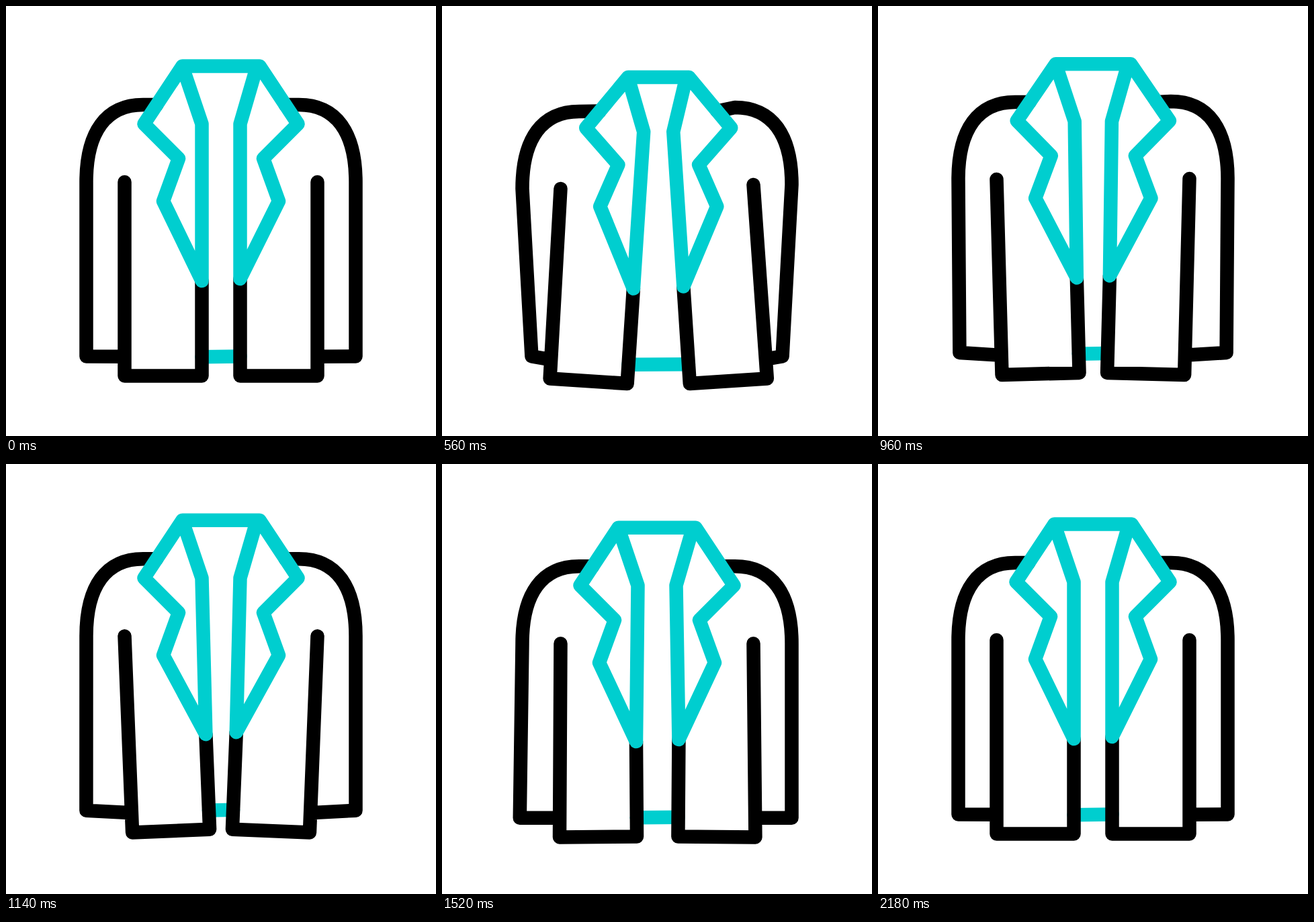
An HTML page that plays this animation: 640 px wide and 640 px high, repeating every 3.6 s.

```html
<!DOCTYPE html>
<html lang="en">
<head>
<meta charset="utf-8">
<title>Jacket</title>
<style>
  html, body { margin: 0; height: 100%; overflow: hidden; background: #fff; }
  svg { display: block; width: 100%; height: 100%; }
  path { fill: none; stroke-width: 20.5; stroke-linecap: round; stroke-linejoin: round; }
  #hem, #collar { stroke: #00cecf; }
  #body { stroke: #000; }
</style>
</head>
<body>
<svg viewBox="0 0 640 640">
  <path id="hem"/>
  <path id="body"/>
  <path id="collar"/>
</svg>
<script>
const LOOP = 3600, STEP = 20;

// Left half at rest; the right half is its mirror image
const arm = { cuff: [119.5, 521.5], pit: [119.5, 262], shoulder: [204, 147], seam: [176.5, 262] };
const lapel = {
  top: [262.5, 89.5], point: [205.5, 175.5], notch: [257, 227],
  low: [234, 290.5], tip: [291.5, 409], fold: [291.5, 175.5] };
const hem = { outer: [176.5, 550.5], inner: [291.5, 550.5] };

// pivot: height the front turns about, sink: drop of the shoulder,
// out and cuff: outward drift, raise: shorter lapel, inset: narrower fold
const left = { pivot: 308, sink: 10, out: 4.3, cuff: 4.5, raise: 0, inset: 0 };
const right = { pivot: 240, sink: 4, out: 6, cuff: 0, raise: 3, inset: 4, mirror: true };

const ease = (t, a, b) =>
  (1 - Math.cos(Math.PI * Math.min(1, Math.max(0, (t - a) / (b - a))))) / 2;
const bump = (t, a, b, c) => ease(t, a, b) - ease(t, b, c);
const mix = (p, q, k) => [p[0] + (q[0] - p[0]) * k, p[1] + (q[1] - p[1]) * k];
const turn = ([x, y], [cx, cy], angle) => [x - angle * (y - cy), y + angle * (x - cx)];
const shift = ([x, y], dx, dy) => [x + dx, y + dy];
const line = (...points) => "M" + points.join("L");
const mapPoints = (points, change) =>
  Object.fromEntries(Object.entries(points).map(([name, p]) => [name, change(p, name)]));

function pose(side, t) {
  const open = bump(t, 0, 535, 1095);
  const inward = bump(t, 535, 1095, 1680);
  const outward = bump(t, 1095, 1680, 2180);
  const lift = -6.3 * bump(t, 535, 1095, 1440) + 5.5 * bump(t, 1095, 1440, 2000);

  const sleeve = mapPoints(arm, (p, name) => name === "cuff"
    ? shift(p, 14 * open - side.cuff * outward, 0)
    : shift(p, 0, side.sink * open));
  const front = mapPoints({ ...lapel, ...hem }, (p, name) => {
    if (name === "tip") p = shift(p, 0, -side.raise);
    if (name === "tip" || name in hem) {
      p = turn(p, arm.seam, -0.041 * inward);
      p = shift(p, -side.out * outward, 3.8 * inward - 1.2 * outward);
    }
    p = turn(p, [115, side.pivot], 0.066 * open);
    return name === "top" ? shift(p, 0, 7 * open) : p;
  });
  front.foldTop = shift(front.top, side.inset, 0);

  return mapPoints({ ...sleeve, ...front },
    ([x, y]) => [side.mirror ? 640 - x : x, y + lift]);
}

function bodyPath({ cuff, pit, shoulder, seam, outer, inner, top, point, tip }) {
  const bend = 0.65, corner = [pit[0], shoulder[1]];
  const curve = [mix(pit, corner, bend), mix(shoulder, corner, bend), shoulder];
  return line(mix(seam, outer, 0.9), cuff, pit) + "C" + curve +
    "L" + mix(top, point, 0.67) + line(seam, outer, inner, tip);
}

const lapelPath = p => line(p.top, p.point, p.notch, p.low, p.tip, p.fold, p.foldTop);
const hemEnd = p => mix(p.inner, p.tip, 0.2);
const draw = (id, d) => document.getElementById(id).setAttribute("d", d);

function frame(now) {
  const t = Math.floor(now % LOOP / STEP) * STEP;
  const l = pose(left, t), r = pose(right, t);
  draw("hem", line(hemEnd(l), hemEnd(r)));
  draw("body", bodyPath(l) + bodyPath(r));
  draw("collar", lapelPath(l) + lapelPath(r) + line(l.top, r.top));
  requestAnimationFrame(frame);
}

frame(0);
</script>
</body>
</html>
```
